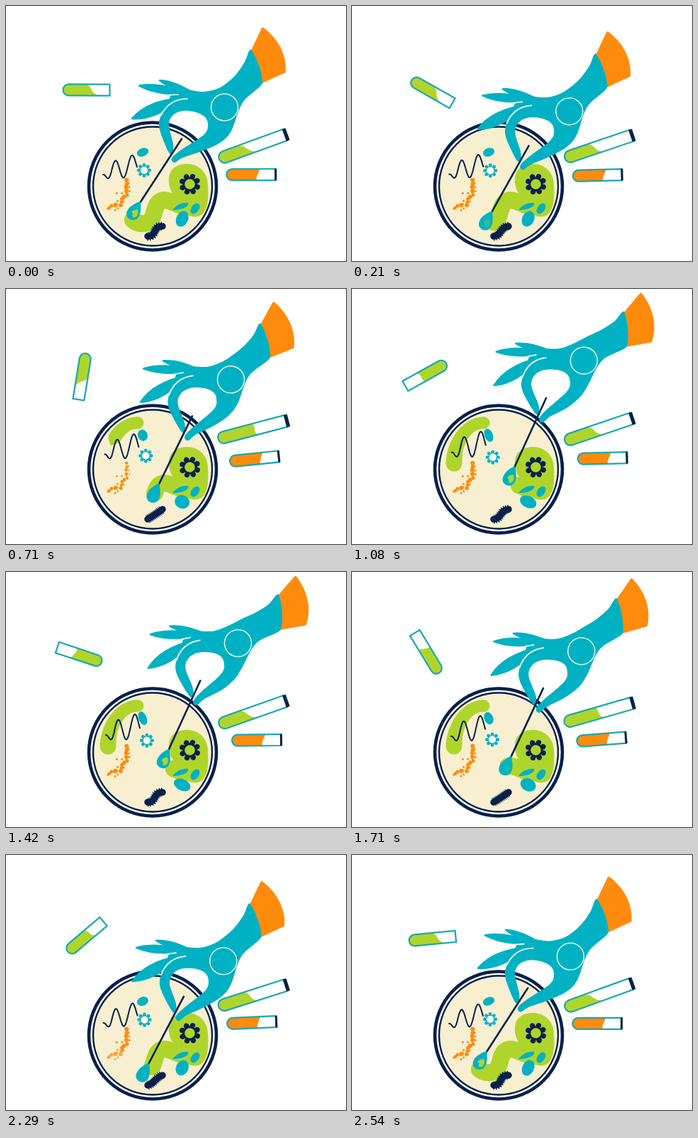
Write an HTML page that moves like this. It is 480 px wide and 360 px high and loops after 2580 ms.

```html
<!DOCTYPE html>
<html lang="en">
<head>
<meta charset="utf-8">
<title>Petri dish</title>
<style>
  html, body { margin: 0; width: 100%; height: 100%; overflow: hidden; background: #fff; }
  svg { display: block; width: 100vw; height: 100vh; }
  .teal { fill: #00b1c3; }
  .navy { fill: #08204a; }
  .green { fill: #afd52c; }
  .orange { fill: #ff8b0c; }
  .line { fill: none; stroke-linecap: round; stroke-linejoin: round; }
  .ink { stroke: #08204a; }
  .lime { stroke: #afd52c; }
  .glass { fill: none; stroke: #1ba7b1; stroke-width: 2.2; }
</style>
</head>
<body>
<svg viewBox="0 0 480 360">
  <g id="tubes"></g>

  <circle cx="207" cy="254.5" r="90" fill="#fff" stroke="#08204a" stroke-width="4.6"/>
  <circle cx="207" cy="254.5" r="84" fill="#f7efd0" stroke="#08204a" stroke-width="2.4"/>

  <g id="arc" class="green"></g>
  <path id="spike" class="green" d="M153 163C160 170 165 179 166 190C157 187 152 177 153 163Z"/>
  <path class="green" d="M230 243C231 228 244 222 258 223C274 224 285 237 285 252C286 268 286 282 279 292C273 299 262 299 255 294C248 288 246 278 238 268C232 261 229 252 230 243Z"/>
  <path id="smear" class="line lime" stroke-width="24" pathLength="100"
    d="M258 283C240 283 234 273 222 274C205 277 214 304 196 307C188 308 182 305 179 302"/>

  <path id="squiggle" class="line ink" stroke-width="2"/>
  <g id="dots" class="orange"></g>
  <g id="tealFlower" class="teal" stroke="#00b1c3"></g>
  <g id="navyFlower" class="navy" stroke="#08204a" transform="translate(259.500 251.500) rotate(20)"></g>
  <ellipse id="cellA" class="teal" transform="translate(193 206.500) rotate(-22)"/>
  <ellipse id="cellB" class="teal" transform="translate(248.700 300.500) rotate(25)"/>
  <ellipse class="teal" rx="5.300" ry="8.300" transform="translate(267 286) rotate(36)"/>
  <path class="teal" d="M235 288C240 281 249 277 257 278C259 282 251 288 235 288Z"/>
  <path id="hairs" class="line ink" stroke-width="12.500" stroke-dasharray="1 1.300" style="stroke-linecap:butt"/>
  <path id="germ" class="line ink" stroke-width="9.500"/>

  <path id="hand" class="teal"/>
  <g id="palm">
    <g id="fingers" class="teal" stroke="#00b1c3" stroke-width="2.500" stroke-linejoin="round"></g>
    <path class="line" stroke="#fff" stroke-width="1.700" d="M206 131C219 127 231 125 243 125M219 154C227 138 240 131 256 131"/>
    <path class="line ink" stroke-width="2.600" d="M248 187.500L189 278"/>
    <path class="teal" d="M190 276C179 279 170 286 170 294C171 301 178 304 184 301C190 297 191 288 190 276Z"/>
    <path id="dab" class="green" d="M177 291C180 287 184 288 186 287C188 294 184 300 179 298C177 296 181 293 177 291Z"/>
  </g>
  <g id="arm">
    <path class="orange" d="M362.500 32Q364 30 366 32C384 46 398 69 395.500 95L363 109.500C362 93 356 76 347.500 62.500Z"/>
    <circle cx="308.500" cy="143" r="19" fill="none" stroke="#d9f1e6" stroke-width="1.600"/>
  </g>
</svg>
<script>
const LOOP = 2580, TAU = Math.PI * 2;
const PIVOT = [308.5, 143];
const $ = id => document.getElementById(id);
const mix = (a, b, k) => a + (b - a) * k;
const clamp = x => Math.min(1, Math.max(0, x));
const ease = x => (x = clamp(x), x * x * (3 - 2 * x));
const ramp = (t, start, length) => ease((t - start) / length);
const set = (node, attrs) => { for (const k in attrs) node.setAttribute(k, attrs[k]); return node; };
const add = (parent, tag, attrs) =>
  set(parent.appendChild(document.createElementNS('http://www.w3.org/2000/svg', tag)), attrs);

let seed = 7;
const random = () => (seed = seed * 16807 % 2147483647) / 2147483647;

// Smooth closed path through points
function blob(p) {
  const n = p.length, at = i => p[(i + n) % n];
  const join = (a, b, c, s) => [0, 1].map(k => (b[k] + s * (c[k] - a[k]) / 6).toFixed(2)).join(' ');
  return 'M' + p[0].join(' ') + p.map((b, i) =>
    `C${join(at(i - 1), b, at(i + 1), 1)} ${join(b, at(i + 1), at(i + 2), -1)} ${at(i + 1).join(' ')}`).join('') + 'Z';
}

// Hand: forearm, back of the hand, then the pinching finger and thumb
const outline = ('347,62 338,79 326,96 313,108 298,117 278,121 256,118 238,117 231,130 219,154 216,168 '
  + '220,184 230,207 235,207 236,195 230,168 236,154 250,148 268,150 281,157 285,168 279,182 246,204 '
  + '234,215 238,221 250,214 276,205 302,193 318,176 334,137 363,109 359,85')
  .split(' ').map(q => q.split(',').map(Number));

// The wrist bends: turn blends from palm to forearm
function bend([x, y], cx, cy, palm, arm) {
  const a = mix(palm, arm, ramp(x, 280, 65)) * Math.PI / 180;
  const dx = x - PIVOT[0], dy = y - PIVOT[1], c = Math.cos(a), s = Math.sin(a);
  return [cx + dx * c - dy * s, cy + dx * s + dy * c];
}

function finger(x0, y0, x1, y1, bulge) {
  const len = Math.hypot(x1 - x0, y1 - y0);
  const nx = (y0 - y1) / len * bulge, ny = (x1 - x0) / len * bulge;
  const mx = mix(x0, x1, 0.6), my = mix(y0, y1, 0.6);
  add($('fingers'), 'path', { d: `M${x0} ${y0}Q${mx + nx} ${my + ny} ${x1} ${y1}Q${mx - nx} ${my - ny} ${x0} ${y0}Z` });
}
finger(266, 124, 217, 105, 7);
finger(258, 124, 188, 112.5, 10);
finger(247, 130, 178, 159, 15);

function makeTube(id, len, r, color, cap) {
  const g = add($('tubes'), 'g', {});
  const shape = `M${len} ${-r}H${r}A${r} ${r} 0 0 0 ${r} ${r}H${len}Z`;
  add(add(g, 'clipPath', { id }), 'path', { d: shape });
  add(g, 'path', { d: shape, fill: '#fff' });
  const liquid = add(g, 'path', { class: color, 'clip-path': `url(#${id})` });
  add(g, 'path', { d: shape, class: 'glass' });
  if (cap) add(g, 'rect', { x: len - 1, y: -r - 0.5, width: cap, height: 2 * r + 1, class: 'navy', rx: 1 });
  return (x, y, turn, level, slant) => {
    const top = level - slant, low = level + slant;
    set(g, { transform: `translate(${x} ${y}) rotate(${turn}) translate(${-len / 2} 0)` });
    set(liquid, { d: `M-2 ${-r}H${top}C${level + 3} ${-r + 1} ${level - 5} ${r - 3} ${low} ${r}H-2Z` });
  };
}
const spinTube = makeTube('spin', 66, 8, 'green', 0);
const longTube = makeTube('long', 99, 8.5, 'green', 5);
const shortTube = makeTube('short', 69, 8, 'orange', 3);

function flower(g, ring, width, spread, dot) {
  add(g, 'circle', { r: ring, fill: 'none', 'stroke-width': width });
  for (let i = 0; i < 8; i++) {
    const a = i * TAU / 8;
    add(g, 'circle', { cx: spread * Math.sin(a), cy: spread * Math.cos(a), r: dot, stroke: 'none' });
  }
}
flower($('navyFlower'), 8.7, 2.8, 11.4, 3.7);
flower($('tealFlower'), 5.8, 1.6, 7.7, 2.4);
add($('tealFlower'), 'circle', { r: 5, fill: '#fff', stroke: 'none' });

// Spots scattered along a diagonal band
const spots = Array.from({ length: 24 }, (_, i) => {
  const u = (i + 0.5) / 24, across = (random() - 0.5) * 20;
  const cx = mix(178, 146, u) + across * 0.7, cy = mix(250, 289, u) + across * 0.5;
  const r = i % 2 ? 1.5 : 2.2 + random();
  return { r, u, node: add($('dots'), 'circle', { cx, cy, r }) };
});

// Upper smear: beads along a quarter turn, thicker towards the end
const beads = Array.from({ length: 40 }, (_, i) => {
  const u = i / 39, a = u * TAU / 4;
  return { r: 6.5 + 5 * u + 2 * (1 - u) ** 4, node: add($('arc'), 'circle', {
    cx: 186 - 42 * Math.sin(a), cy: 246 - 57 * Math.cos(a) }) };
});

function squiggle(k) {
  let d = '';
  for (let u = 0; u <= 1; u += 0.02) {
    const wave = mix(14, 16, k) * Math.min(1, u * 4) * Math.sin(u * TAU * 2.1);
    d += `${d ? 'L' : 'M'}${mix(137, 141, k) + 49 * u} ${mix(238, 230, k) - 16 * u + wave}`;
  }
  return d;
}

function draw(t) {
  const ph = t / LOOP * TAU, cos = Math.cos(ph), sin = Math.sin(ph);
  const k = (1 - cos) / 2, beat = Math.cos(2 * ph);

  spinTube(108.5 + 5 * cos, 118.5 + 5 * sin, t / LOOP * 360, 41, 5.5 + 8 * Math.cos(ph - TAU / 8));
  longTube(347.3, 199, -17.3 - 2.7 * beat, 48.5 - 6 * beat, 8.5 + 6 * beat);
  shortTube(349.7 - 4 * cos, 238 + 2 * sin, -3 + 3 * beat, 45, -2);

  // lift raises the swab along the dish, hook curls it at the far end
  const lift = ramp(t, 330, 800) - ramp(t, 1420, 960);
  const hook = 1 - ease(Math.min(t, LOOP - t) / 340);
  const cx = 306 + 21.5 * lift + 6 * lift * (1 - lift) + 2.5 * hook;
  const cy = 151.5 - 51 * lift - 8.5 * hook;
  const palm = -5.8 - 2.7 * lift + 5.8 * hook;
  const arm = 15 * lift * lift - 0.8;
  const pose = r => ({ transform: `translate(${cx} ${cy}) rotate(${r}) translate(${-PIVOT[0]} ${-PIVOT[1]})` });
  set($('hand'), { d: blob(outline.map(p => bend(p, cx, cy, palm, arm))) });
  set($('palm'), pose(palm));
  set($('arm'), pose(arm));
  set($('dab'), { opacity: clamp(hook + ramp(lift, 0.7, 0.3)) });
  set($('smear'), { 'stroke-dasharray': `${66 - 44 * lift * lift + 34 * hook} 300` });

  // Upper smear is drawn, rests, then fades
  const front = (t - 350) / 520 * beads.length;
  beads.forEach(({ r, node }, i) => set(node, { r: r * clamp((front - i) / 6) }));
  set($('arc'), { opacity: 1 - ramp(t, 1880, 420) });
  set($('spike'), { opacity: ramp(t, 330, 60) - ramp(t, 450, 70) });

  set($('squiggle'), { d: squiggle(k) });
  set($('tealFlower'), { transform: `translate(${195 + 4 * k} ${232 + 6 * k})` });
  set($('cellA'), { rx: mix(8.5, 5.6, k), ry: mix(5.7, 10, k) });
  set($('cellB'), { rx: mix(8.3, 12.4, k), ry: mix(11.6, 8, k) });

  const curl = Math.sqrt(Math.max(0, beat));
  const body = `M200 325C${207 + 6 * curl} ${321 + 5 * curl} ${214 - 7 * curl} ${316 - 6 * curl} 221 311`;
  set($('germ'), { d: body });
  set($('hairs'), { d: body });

  // Upper spots shrink early, lower ones fade late
  const shrink = ramp(t, 400, 250) - ramp(t, 750, 250);
  const fade = ramp(t, 1850, 200) - ramp(t, 2150, 250);
  for (const { r, u, node } of spots)
    set(node, { r: r * (1 - 0.3 * shrink * (1 - u)), opacity: 1 - 0.7 * fade * ramp(u, 0.5, 0.2) });
}

function tick() {
  draw(performance.now() % LOOP);
  requestAnimationFrame(tick);
}
tick();
</script>
</body>
</html>
```
